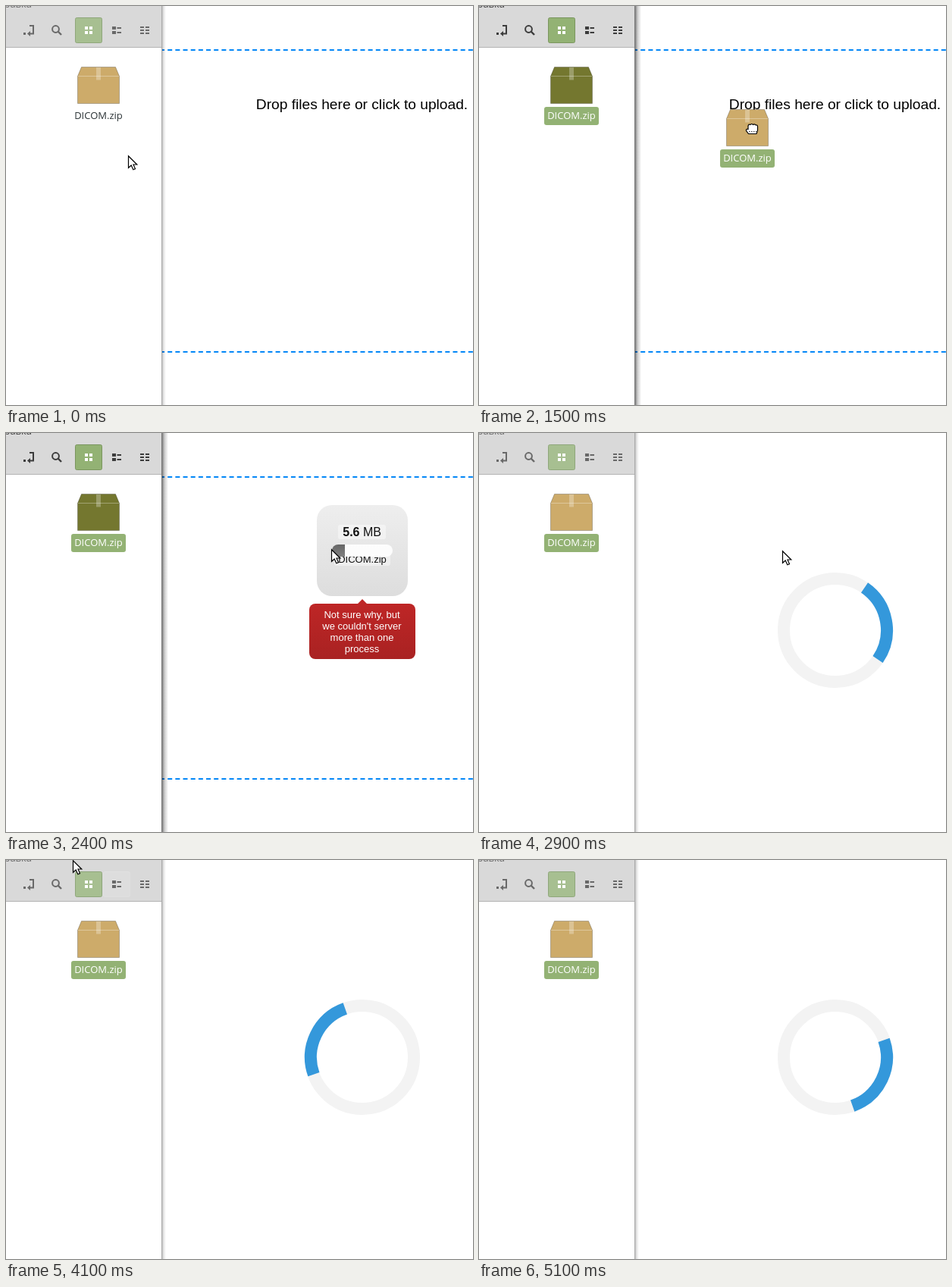
An HTML page that plays this animation: 616x526 px, repeating every 5200 ms.

```html
<!DOCTYPE html>
<html lang="en">
<head>
<meta charset="utf-8">
<title>Drop to upload</title>
<style>
html, body { margin: 0; width: 100%; height: 100%; overflow: hidden; background: #fff; }
svg { display: block; }
.ui { font: 13px "Open Sans", "Noto Sans", sans-serif; }
.page { font-family: "Liberation Sans", Arial, sans-serif; }
.mid { text-anchor: middle; }
</style>
</head>
<body>
<svg width="616" height="526" viewBox="0 0 616 526">
  <defs>
    <linearGradient id="shade"><stop offset="0" stop-color="#000" stop-opacity=".5"/><stop offset=".4" stop-color="#000" stop-opacity=".2"/><stop offset="1" stop-color="#000" stop-opacity="0"/></linearGradient>
    <linearGradient id="tile" x2="0" y2="1"><stop offset="0" stop-color="#eee"/><stop offset="1" stop-color="#ddd"/></linearGradient>
    <linearGradient id="red" x2="0" y2="1"><stop offset="0" stop-color="#be2626"/><stop offset="1" stop-color="#a92222"/></linearGradient>
    <linearGradient id="fill" x2="0" y2="1"><stop offset="0" stop-color="#666"/><stop offset="1" stop-color="#808080"/></linearGradient>
    <clipPath id="bar"><rect x="430" y="147" width="80" height="16" rx="8"/></clipPath>
    <g id="box">
      <path d="M99.5 80.5H144.5L149.5 92.5V128.5H94.5V92.5Z" stroke="#000" stroke-opacity=".24"/>
      <path d="M95 92.5H149" stroke="#fff" stroke-opacity=".32"/>
      <path d="M119 81H125V97.5H119Z" fill="#fff" fill-opacity=".28"/>
    </g>
  </defs>

  <g class="page">
    <g id="zone">
      <path id="edges" d="M203.03 58H616M203.03 456H616" stroke="#0087f7" stroke-width="2"/>
      <text id="msg" class="mid" x="469.5" y="136" font-size="19.2">Drop files here or click to upload.</text>
    </g>
    <g id="preview">
      <rect x="410" y="95" width="120" height="120" rx="20" fill="url(#tile)"/>
      <g fill="#fff" fill-opacity=".4"><rect x="438" y="121" width="63" height="19" rx="3"/><rect x="433" y="159" width="74" height="16" rx="3"/></g>
      <g class="mid" fill="#111">
        <text x="469.6" y="136" font-size="16"><tspan font-weight="bold">5.6</tspan> MB</text>
        <text x="470" y="171" font-size="13">DICOM.zip</text>
      </g>
      <g clip-path="url(#bar)">
        <path d="M430 147h80v16h-80z" fill="#fff" fill-opacity=".9"/>
        <rect id="done" x="430" y="147" height="16" fill="url(#fill)"/>
      </g>
    </g>
    <g id="error">
      <path d="M464 225L470 219L476 225Z" fill="#be2626"/>
      <rect x="400" y="225" width="140" height="73" rx="8" fill="url(#red)"/>
      <g id="lines" class="mid" font-size="13" fill="#fff"></g>
    </g>
    <g id="loader" fill="none" stroke-width="16">
      <circle cx="470" cy="260" r="68" stroke="#f3f3f3"/>
      <path id="arc" d="M421.92 211.92A68 68 0 0 1 518.08 211.92" stroke="#3498db"/>
    </g>
  </g>

  <rect id="shadow" x="206" y="0" height="526" fill="url(#shade)"/>
  <path d="M0 0H205V526H0Z" fill="#fff"/>
  <path d="M0 0H205V54H0Z" fill="#d9d9d9"/>
  <path d="M0 54.5H205" stroke="#b4b4b4"/>
  <path id="side" d="M205.5 0V526"/>
  <g id="bar-icons">
    <text class="ui" x="34" y="2" text-anchor="end">Справка</text>
    <path d="M23 35h3v3h-3zM28 36.5l4-3.5v7z"/>
    <path d="M31 26H36V36.5H31" fill="none" stroke-width="2"/>
    <circle cx="65.5" cy="30.5" r="4.4" fill="none" stroke-width="2"/>
    <path d="M68.5 33.5L73 38" stroke-width="2.4"/>
    <rect id="hover" x="128.5" y="15.5" width="35" height="33" rx="2" fill="#fff" fill-opacity=".2" stroke="#fff" stroke-opacity=".25"/>
    <path d="M140 27h5v4h-5zM140 33h5v4h-5zM146.500 28h5.500v2h-5.500zM146.500 34h5.500v2h-5.500z"/>
    <path d="M177 28H182M184 28H189M177 32H182M184 32H189M177 36H182M184 36H189" stroke-width="2"/>
  </g>
  <rect id="toggle" x="91.500" y="15.500" width="35" height="33" rx="2"/>
  <path d="M104 27h4v4h-4zM110 27h4v4h-4zM104 33h4v4h-4zM110 33h4v4h-4z" fill="#fff"/>

  <use id="file" href="#box"/>
  <rect id="pill" x="86" y="133" width="72" height="24" rx="3" fill="#93b274"/>
  <text id="label" class="ui mid" x="122" y="149">DICOM.zip</text>

  <g id="drag">
    <use href="#box" fill="#cdab6a"/>
    <rect x="86" y="133" width="72" height="24" rx="3" fill="#93b274"/>
    <text class="ui mid" x="122" y="149" fill="#fff">DICOM.zip</text>
    <path d="M123.500 112.500L120.500 108.500Q120 105.500 123 106.500V102Q123.500 99.500 126 100.500Q127.500 98.500 129.500 100.500Q131.500 99 133 101Q135.500 100.500 135.500 103V108L134 112.500Z" fill="#fff" stroke="#000" stroke-width="1.200"/>
    <path d="M124 109.500H134" stroke="#000" stroke-width=".8" stroke-dasharray="1.500 1.500"/>
  </g>
  <path id="arrow" d="M.5 .8V16.300L4.200 13L6.800 18.800L9.500 17.600L7 12H11.800Z" fill="#fff" stroke="#000" stroke-width="1.200"/>
</svg>
<script>
const LOOP = 5200, STEP = 100;
const $ = id => document.getElementById(id);
const set = (id, attrs) => { for (const k in attrs) $(id).setAttribute(k, attrs[k]); };
const show = (id, on) => set(id, { visibility: on ? "visible" : "hidden" });
const clamp = v => Math.max(0, Math.min(1, v));

// pointer path: time, x, y
const path = [
  [0, 161, 197], [300, 161, 197], [400, 154, 150], [500, 144, 100], [700, 144, 100],
  [1200, 128, 106], [1300, 190, 122], [1400, 282, 146], [1500, 360, 162],
  [1600, 415, 163], [1700, 432, 158], [1800, 432, 158], [2100, 436, 151],
  [2400, 429, 153], [2900, 400, 155], [3600, 353, 150], [3700, 345, 146],
  [3800, 310, 125], [3900, 235, 85], [4000, 145, 33], [4100, 88, 0],
  [4200, 56, -12], [4300, 30, -40], [5200, 30, -40]
];

function pointer(t) {
  const i = path.findIndex(p => p[0] > t);
  const a = path[i - 1], b = path[i], k = (t - a[0]) / (b[0] - a[0]);
  return [a[1] + (b[1] - a[1]) * k, a[2] + (b[2] - a[2]) * k];
}

["Not sure why, but", "we couldn't server", "more than one", "process"].forEach((s, i) => {
  const line = document.createElementNS("http://www.w3.org/2000/svg", "text");
  line.setAttribute("x", 469.5);
  line.setAttribute("y", 244 + 15 * i);
  line.textContent = s;
  $("lines").append(line);
});

function draw(t) {
  const within = (a, b) => t >= a && t < b;
  const [x, y] = pointer(t);
  const active = within(500, 2500), picked = t >= 700;
  const dragging = within(1300, 1900), over = within(1600, 1900);
  const ink = active ? "#3c3c3c" : "#696969";

  // file window
  set("shadow", { width: active ? 8 : 5, opacity: active ? 1 : .5 });
  set("side", { stroke: active ? "#777" : "#aaa" });
  set("bar-icons", { fill: ink, stroke: "none" });
  document.querySelectorAll("#bar-icons [stroke-width]").forEach(e => e.setAttribute("stroke", ink));
  set("toggle", { fill: active ? "#93b274" : "#a7bf91", stroke: active ? "#7b965f" : "#8fa77b" });
  set("hover", { opacity: within(4000, 4100) ? 1 : within(4100, 4200) ? .5 : 0 });
  const hover = within(500, 1300);
  set("file", { fill: active && picked ? (hover ? "#8b8d39" : "#74772f") : hover ? "#e3c07c" : "#cdab6a" });
  set("file", { opacity: 1 });
  show("pill", picked);
  set("label", { fill: picked ? "#fff" : "#2c3437" });

  // upload page
  show("zone", t < 2500);
  set("edges", { "stroke-dasharray": over ? "none" : "6 4.17" });
  set("msg", { opacity: t >= 1900 ? 0 : over ? .5 : 1 });
  show("preview", within(1900, 2500));
  set("done", { width: 17 * clamp((t - 2000) / 400) });
  show("error", within(2300, 2500));
  show("loader", t >= 2500);
  set("arc", { transform: `rotate(${79.5 + .18 * (t - 2900)} 470 260)` });

  // pointer and dragged file
  show("drag", dragging);
  set("drag", { transform: `translate(${Math.round(x) - 128} ${Math.round(y) - 106})` });
  show("arrow", !dragging);
  set("arrow", { transform: `translate(${Math.round(x)} ${Math.round(y)})` });
}

const start = performance.now();
function tick() {
  const t = (performance.now() - start) % LOOP;
  draw(Math.floor(t / STEP) * STEP);
  requestAnimationFrame(tick);
}
tick();
</script>
</body>
</html>
```
